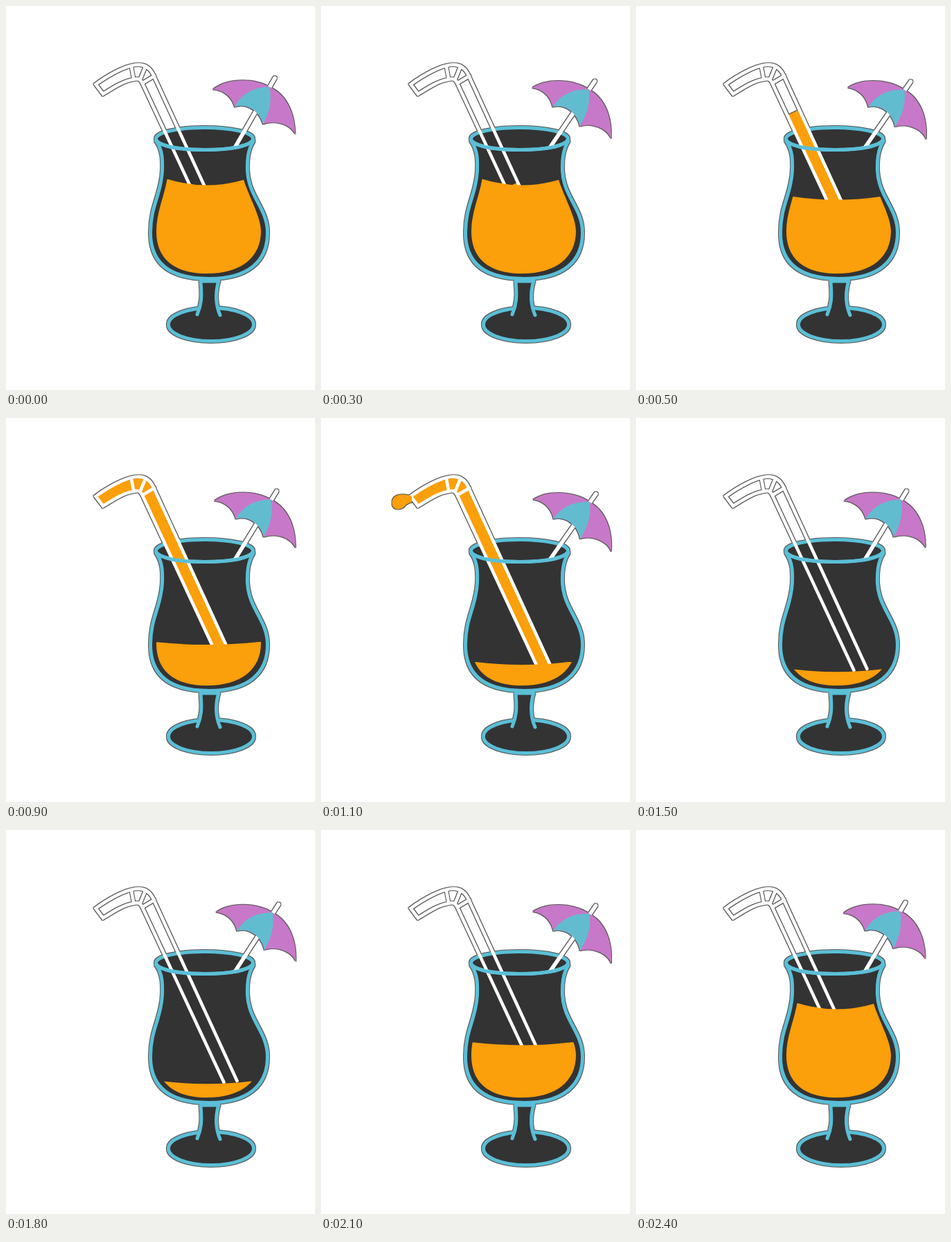
An HTML page that plays this animation: 446 px wide and 554 px high, repeating every 2.5 s.

```html
<!DOCTYPE html>
<html lang="en">
<head>
<meta charset="utf-8">
<title>Cocktail</title>
<style>
html, body { margin: 0; width: 100%; height: 100%; overflow: hidden; background: #fff; }
svg { display: block; width: 446px; height: 554px; }
.dark { fill: #333; }
.juice { fill: #fb9f0a; }
.rim { fill: none; stroke: #5abfd7; stroke-width: 5; stroke-linecap: round; stroke-linejoin: round; }
.glass { fill: #333; }
.white { fill: none; stroke: #fff; stroke-width: 4.6; stroke-linecap: round; }
</style>
</head>
<body>
<svg viewBox="0 0 446 554">
  <defs>
    <!-- thin dark contour around everything that is painted -->
    <filter id="contour" filterUnits="userSpaceOnUse" x="0" y="0" width="446" height="554" color-interpolation-filters="sRGB">
      <feMorphology in="SourceAlpha" operator="dilate" radius="1" result="grown"/>
      <feFlood flood-color="#222" flood-opacity=".75"/>
      <feComposite in2="grown" operator="in"/>
      <feMerge><feMergeNode/><feMergeNode in="SourceGraphic"/></feMerge>
    </filter>
    <clipPath id="bowl">
      <path d="M234 240C231 270 217 295 217 325C217 365 243 386 290 386C340 386 368 362 368 325C368 302 347 270 340 240Z"/>
    </clipPath>
  </defs>
  <g filter="url(#contour)">
    <ellipse class="rim glass" cx="296" cy="459.500" rx="61.500" ry="24"/>
    <path class="dark" d="M281 396H306C302 415 302 432 308 447H276C284 430 283 412 281 396Z"/>
    <path class="rim" d="M281 397H307M281 398C283 420 282 431 276 445M306.500 398C302 415 302 430 309 446"/>
    <path class="rim glass" d="M217 195C226 208 226 222 225.500 238C224 272 208.500 288 208.500 327C208.500 372 238 393.500 293 393.500C350 393.500 377.500 368 377.500 327C377.500 292 350.500 276 348.500 238C348 222 349 208 357 195"/>
    <ellipse class="rim glass" cx="286.500" cy="191.500" rx="70" ry="16"/>

    <path id="flow" fill="none" stroke="#fb9f0a" stroke-width="16" pathLength="372"
      d="M324 363L205 106C200 93 192 94 184 96C168 99 150 108 133 121"/>
    <path class="white" d="M333.500 362L213 100C208 89 200 83 186 85C172 87 150 98 129.500 113L140 127C156 117 170 108 184 106C191 104 194 105 197 112L314.500 364"/>
    <path class="white" d="M181 88L184 104M201 88L194 105M214 101L199 110"/>

    <g id="umbrella">
      <path class="white" style="stroke-width:5.600" d="M330.500 204L388 104"/>
      <path fill="#c878c8" d="M298.500 120.500C319 103.500 358 103.500 380 116.500C404 127 417 154 417.500 185C411 171 390 164 371 170.500C367 154 350 139 330 145.500C326 131 314 121 298.500 120.500Z"/>
      <path fill="#62bcd0" d="M380 116.500C357 117 340 127 330 145.500C350 139 367 154 371 170.500C381 152 384 134 380 116.500Z"/>
    </g>

    <path class="rim" d="M216.500 191.500C217 202 248 207.500 287 207.500S356 202 356.500 191.500"/>
    <path id="juice" class="juice" clip-path="url(#bowl)"/>
    <path id="blob" class="juice" d="M131 113C120 108 103 109 102.500 122C102.500 134 115 133 120 128C124 123 128 122 131 122Z"/>
    <g id="spray" class="juice"><circle/><circle/><circle/></g>
  </g>
</svg>
<script>
const $ = id => document.getElementById(id);
const smooth = k => (1 - Math.cos(Math.PI * k)) / 2;

// value at x on a line through [x, y] points, optionally eased
function ramp(x, points, ease = k => k) {
  if (x <= points[0][0]) return points[0][1];
  for (let i = 1; i < points.length; i++) {
    const [x0, y0] = points[i - 1], [x1, y1] = points[i];
    if (x <= x1) return y0 + (y1 - y0) * ease((x - x0) / (x1 - x0));
  }
  return points[points.length - 1][1];
}

const tilt = [[0, 0], [430, 5.3], [800, .7], [1170, 5.6], [1600, .8], [2000, 5.5], [2500, 0]];
const level = [[300, 250], [500, 275], [900, 323], [1100, 352], [1200, 362.5], [1800, 362.5], [2400, 250]];
const sprayEnds = [[49, 122], [61, 78], [68, 146]];

function draw(t) {
  $('umbrella').setAttribute('transform', `rotate(${ramp(t, tilt, smooth)} 332 205)`);

  const y = ramp(t, level);
  const half = ramp(y, [[250, 56], [323, 76], [363, 63]]);
  const sag = ramp(y, [[250, 8.5], [275, 4.5], [363, 3.8]]);
  $('juice').setAttribute('d',
    `M150 ${y}H${290 - half}Q290 ${y + 2 * sag} ${290 + half} ${y}H430V400H150Z`);

  const head = ramp(t, [[299, 0], [300, 117], [500, 234], [750, 372]]);
  const tail = ramp(t, [[1150, 0], [1450, 372]]);
  const flow = $('flow');
  flow.style.display = head > tail ? '' : 'none';
  flow.setAttribute('stroke-dasharray', `0 ${tail} ${head - tail} 999`);

  const size = ramp(t, [[950, 0], [1100, 1], [1200, 1.65]]);
  const blob = $('blob');
  blob.style.display = size > 0 && t < 1300 ? '' : 'none';
  blob.setAttribute('transform', `translate(131 117) scale(${size}) translate(-131 -117)`);

  $('spray').style.display = t >= 1300 && t < 1500 ? '' : 'none';
  const k = ramp(t, [[1200, .1], [1400, 1]]);
  [...$('spray').children].forEach((drop, i) => {
    const [ex, ey] = sprayEnds[i];
    drop.setAttribute('cx', 98 + (ex - 98) * k);
    drop.setAttribute('cy', 122 + (ey - 122) * k);
    drop.setAttribute('r', 11 - 5 * k);
  });
}

const start = performance.now();
function tick() {
  const t = (performance.now() - start) % 2500;
  draw(Math.floor(t / 100) * 100);
  requestAnimationFrame(tick);
}
tick();
</script>
</body>
</html>
```
